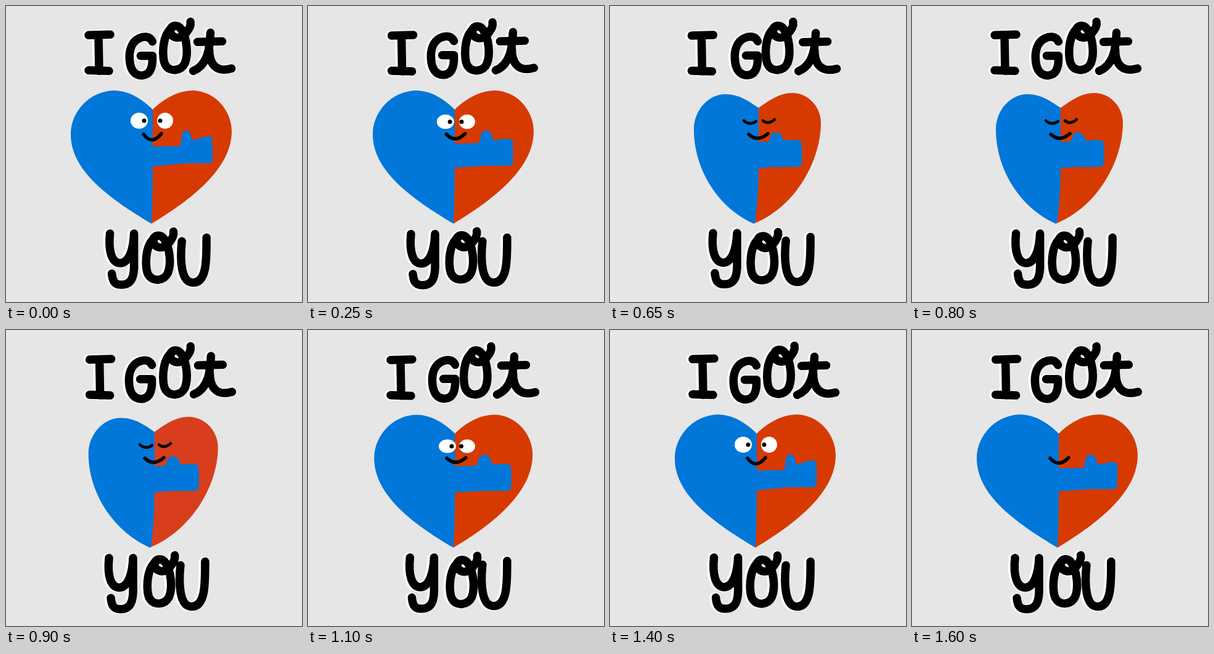
Write an HTML page with a canvas that moves like this. It is 480 by 480 pixels and loops after 1.65 s.

```html
<!DOCTYPE html>
<html lang="en">
<head>
<meta charset="utf-8">
<title>I got you</title>
<style>
  html, body { margin: 0; height: 100%; overflow: hidden; background: #e6e6e6; }
  canvas { display: block; width: 480px; height: 480px; }
</style>
</head>
<body>
<canvas width="480" height="480" role="img" aria-label="I got you"></canvas>
<script>
const ctx = document.querySelector('canvas').getContext('2d');
const STEP = 50, LOOP = 33, HUG = 28;
const BLUE = '#0077d9', RED = '#d73a00', RED_ALT = '#d83e1c';

// Brush lettering: path and offset of each letter
const O = 'M243 376C226 388 226 428 233 437C240 448 258 446 264 433C270 418 267 392 258 378C252 370 242 371 240 379C240 394 258 396 266 384C272 376 274 372 273 366';
const letters = [
  ['M134 47L169 46M150 47L151 105M134 104L167 105', 0, 1],
  ['M236 57C232 48 222 48 214 52C202 58 198 72 199 86C200 104 208 112 219 112C232 111 237 100 236 80L217 80', 2, 0],
  [O, 25, -340],
  ['M332 43C331 65 329 95 304 105M330 70C330 95 342 108 366 101M311 58L351 57', 1, 0],
  ['M167 369C164 398 170 417 184 417C198 416 205 395 206 369L206 415C207 440 202 452 185 452C172 452 171 442 170 434', 0, 0],
  [O, 0, 0],
  ['M286 381C283 410 284 448 304 448C327 448 326 410 326 375', -2, 0]
].map(([d, x, y]) => ({ path: new Path2D(d), x, y }));

const mix = (a, b, p) => a + (b - a) * p;

function ease(from, to, step) {
  const p = Math.min(1, Math.max(0, (step - from) / (to - from)));
  return p * p * (3 - 2 * p);
}

function fill(color, draw) {
  ctx.beginPath();
  draw();
  ctx.fillStyle = color;
  ctx.fill();
}

function ellipse(color, x, y, rx, ry) {
  fill(color, () => ctx.ellipse(x, y, rx, ry, 0, 0, 7));
}

// Arc from one end to the other through a middle point
function arc(x1, y1, mx, my, x2, y2, width) {
  ctx.beginPath();
  ctx.moveTo(x1, y1);
  ctx.quadraticCurveTo(2 * mx - (x1 + x2) / 2, 2 * my - (y1 + y2) / 2, x2, y2);
  ctx.strokeStyle = '#000';
  ctx.lineWidth = width;
  ctx.stroke();
}

function drawHeart(red, squeeze) {
  const s = (a, b) => mix(a, b, squeeze);
  const cx = s(238, 241), cy = s(168, 165), tipX = s(236, 233), tipY = 353;
  const half = (color, dir, inner, topX, topY, sideX, sideY) => fill(color, () => {
    ctx.moveTo(cx, cy);
    ctx.bezierCurveTo(cx + dir * 17, cy - s(17, 11), topX - dir * 24, topY, topX, topY);
    ctx.bezierCurveTo(mix(topX, sideX, .58), topY + 1, sideX, mix(topY, sideY, .5), sideX, sideY);
    ctx.bezierCurveTo(sideX, sideY + 60, mix(sideX, tipX, s(.49, .36)), s(313, 325), tipX, tipY);
    ctx.lineTo(tipX + s(0, 2), tipY - 1);
    ctx.quadraticCurveTo(inner, 310, inner, 262);
  });
  half(red, 1, cx - 5, s(303, 297), s(137, 141), s(366, 342), s(203, 189));
  half(BLUE, -1, cx, s(175, 186), s(137, 143), s(105, 136), s(208, 200));
}

function drawArm(squeeze, fist) {
  const f = (a, b) => mix(a, b, fist);
  const x = f(237, 241), top = f(228, 221), bottom = f(260, 263);
  const thumbX = f(292, 287) - 18 * squeeze, thumbTop = 202 + 3 * squeeze, w = f(8, 10.5);
  const right = f(336, 331) - 20 * squeeze, handTop = f(211, 217), handBottom = f(255, 261);
  const knuckle = right - f(6, 2), finger = (handBottom - handTop) / 4;
  fill(BLUE, () => {
    ctx.moveTo(x - 5, top);
    ctx.lineTo(thumbX - w - 3, top - 1);
    ctx.quadraticCurveTo(thumbX - w, top - 2, thumbX - w + 1, thumbTop + 9);
    ctx.quadraticCurveTo(thumbX - w + 2, thumbTop, thumbX, thumbTop);
    ctx.quadraticCurveTo(thumbX + w, thumbTop, thumbX + w, thumbTop + 10);
    ctx.lineTo(thumbX + w + 4, f(218, 218));
    ctx.lineTo(right - 10, handTop);
    for (let y = handTop, j = 0; j < 4; j++, y += finger) {
      ctx.bezierCurveTo(right + 2, y, right + 2, y + finger, j < 3 ? knuckle : right - 8, y + finger);
    }
    ctx.lineTo(right - 45, handBottom);
    ctx.lineTo(x, bottom);
    ctx.lineTo(x - 5, bottom);
  });
}

function drawFace(step, squeeze, fist) {
  const f = (a, b) => mix(a, b, fist);
  arc(f(223, 225), 208, f(237, 240), f(217, 214.5), f(252, 256), 207, 5.5);
  if (step === 4) return;
  const left = f(216, 226), y = f(186, 188.5);
  if (step > 10 && step < 20) {
    arc(left - 9, 186, left + 1, 190.5, left + 11, 187, 4.5);
    arc(248, 186, 257, 189, 267, 184, 4.5);
    return;
  }
  ellipse('#fff', left, y, 14, f(13, 11));
  ellipse('#fff', 258, y, 13, f(13, 11));
  ellipse('#000', f(224, 233), y, 3.5, 3.5);
  ellipse('#000', f(250, 248.5), y, 3.5, 3.5);
}

// Four drawings of the lettering take turns, each letter swaying in its own phase
function drawLetters(step) {
  const turn = Math.floor(step % 14 / 3.5) * Math.PI / 2;
  for (const [color, width, dx] of [['#fff', 16, -2.5], ['#000', 13.5, 0]]) {
    ctx.strokeStyle = color;
    ctx.lineWidth = width;
    letters.forEach(({ path, x, y }, n) => {
      const phase = turn - n * 2.75;
      ctx.save();
      ctx.translate(x + dx + 1.6 * Math.sin(phase), y - .7 * Math.cos(phase));
      ctx.stroke(path);
      ctx.restore();
    });
  }
}

function frame() {
  const step = Math.floor(performance.now() / STEP) % LOOP % HUG;
  const squeeze = ease(6, 13, step) - ease(17, 23, step);
  const fist = ease(0, 8, step) - ease(22, 28, step);
  ctx.lineCap = ctx.lineJoin = 'round';
  ctx.fillStyle = '#e6e6e6';
  ctx.fillRect(0, 0, 480, 480);
  drawLetters(step);
  drawHeart(step % 9 || !step ? RED : RED_ALT, squeeze);
  drawArm(squeeze, fist);
  drawFace(step, squeeze, fist);
  requestAnimationFrame(frame);
}
frame();
</script>
</body>
</html>
```
